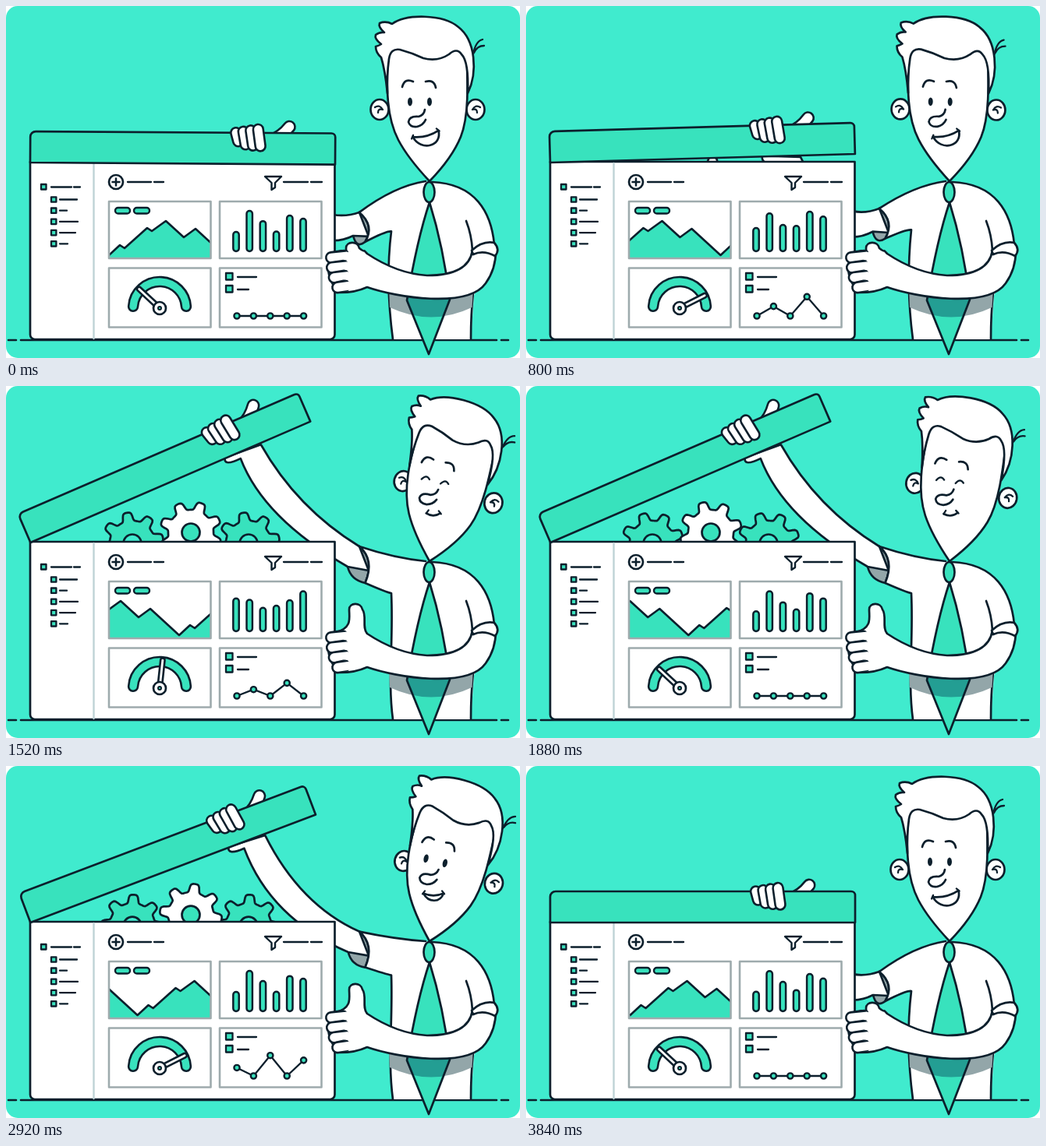
An HTML page with a canvas for the animation above (3.88 s loop, 659x452 px).

```html
<!DOCTYPE html>
<html lang="en">
<head>
<meta charset="utf-8">
<title>Open the dashboard</title>
<style>
html, body { margin: 0; width: 100%; height: 100%; overflow: hidden; background: #fff; }
canvas { display: block; width: 659px; height: 452px; }
</style>
</head>
<body>
<canvas id="stage" width="659" height="452"></canvas>
<script>
const c = document.getElementById('stage').getContext('2d');
const LOOP = 3880, HALF = LOOP / 2, BEAT = LOOP / 4;
const INK = '#0c1f2c', BG = '#40ebce', TEAL = '#38e2bd', WHITE = '#fff', GREY = '#93a6a9', SHADE = '#239e93';
const { sin, cos, tanh, PI, min, max } = Math;
const RAD = PI / 180;

// Motion: every part is a sum of eased steps and humps between two times
const part = (t, a, b) => min(1, max(0, (t - a) / (b - a)));
const ease = (t, a, b) => { const u = part(t, a, b); return u * u * (3 - 2 * u); };
const hump = (t, a, b) => sin(PI * part(t, a, b)) ** 2;

const kick = t => hump(t, 900, 1400);
const lidOpen = t => ease(t, 740, 1120) - ease(t, 2810, 3340) + .2 * kick(t) - .025 * hump(t, -250, 600);
const headTurn = t => ease(t, 760, 1120) - ease(t, 2950, 3350) - .35 * hump(t, 1450, 2300);
const tieSwing = t => 10 * hump(t, 800, 1500) + 5 * hump(t, 2050, 2650) - 5 * hump(t, 3000, 3700);
const thumbUp = t => ease(t, 850, 1150) - ease(t, 2950, 3300);
const gearRise = t => ease(t, 850, 1300) - ease(t, 2850, 3300);
const grin = t => 1 - ease(t, 850, 1050) + .5 * ease(t, 2450, 2850) + .5 * ease(t, 3000, 3300);
const needle = t => 137 - 110 * (ease(t, 100, 750) - ease(t, 1250, 1780));
const dotRise = t => ease(t, 200, 1200) - ease(t, 1250, 1750);

// Drawing helpers
function paint(fill, stroke = INK, width = 2.7, path) {
  const p = path ? [path] : [];
  if (fill) { c.fillStyle = fill; c.fill(...p); }
  if (stroke) { c.strokeStyle = stroke; c.lineWidth = width; c.stroke(...p); }
}
const shape = (d, fill, stroke, width) => paint(fill, stroke, width, new Path2D(d));
function oval(x, y, rx, ry, fill, stroke, width) {
  c.beginPath(); c.ellipse(x, y, rx, ry, 0, 0, 2 * PI); paint(fill, stroke, width);
}
function box(x, y, w, h, r, fill, stroke, width) {
  c.beginPath(); c.roundRect(x, y, w, h, r); paint(fill, stroke, width);
}
function tube(d, width, fill) {
  shape(d, null, INK, width);
  shape(d, null, fill, width - 5.2);
}
const line = (d, width = 2.3) => shape(d, null, INK, width);
const tick = (x, y, size) => box(x, y, size, size, 0, TEAL, INK, 2.3);
function group(draw) { c.save(); draw(); c.restore(); }
function spin(x, y, deg) { c.translate(x, y); c.rotate(deg * RAD); c.translate(-x, -y); }

function gear(x, y, turn, fill) {
  c.beginPath();
  for (let a = 0; a < 360; a += 2) {
    const r = 34.5 + 5.5 * tanh(2.4 * cos(8 * a * RAD) - .3), q = (a + turn) * RAD;
    c.lineTo(x + r * sin(q), y - r * cos(q));
  }
  c.closePath(); paint(fill);
  oval(x, y, 11.5, 11.5, fill === WHITE ? TEAL : BG);
}

function gears(t) {
  const y = 46 * (1 - gearRise(t)), turn = t * 90 / LOOP;
  gear(162, 202 + y, 25 - turn, TEAL);
  gear(311, 202 + y, 25 - turn, TEAL);
  gear(237, 188 + y, turn - 15, WHITE);
}

function hills(t) {
  const period = 148, ridge = [[0, 276], [23, 297], [38, 286], [75, 320], [89, 307], [95, 311], [124, 285], [130, 289]];
  group(() => {
    c.beginPath(); c.rect(132, 251, 130, 73); c.clip();
    c.beginPath(); c.moveTo(-200, 340);
    for (let k = -1; k < 3; k++)
      for (const [x, y] of ridge) c.lineTo(205 + x + (k - t / LOOP) * period, y);
    c.lineTo(700, 340);
    paint(TEAL, INK, 2.6);
  });
  box(140, 259, 19, 7.5, 4, TEAL, INK, 2.4);
  box(164, 259, 20, 7.5, 4, TEAL, INK, 2.4);
}

// Each bar: mean top, swing, phase in degrees
const BARS = [[281, 9, 0], [269, -6, 0], [280, 5, 220], [287, 7, 70], [274, 10, 120], [268, 5, 0]];
function bars(t) {
  BARS.forEach(([mean, swing, phase], i) => {
    const y = mean + swing * cos(2 * PI * t / BEAT - phase * RAD);
    box(291.3 + 17.2 * i, y, 7.4, 315 - y, 3.7, TEAL, INK, 2.5);
  });
}

function gauge(t) {
  c.beginPath(); c.arc(197, 388, 34, PI * 1.02, PI * 1.98);
  paint(null, INK, 14.5); paint(null, TEAL, 9.3);
  const a = needle(t % HALF) * RAD;
  tube(`M197 388L${197 + 36 * cos(a)} ${388 - 36 * sin(a)}`, 8, WHITE);
  oval(197, 388, 8, 8, WHITE);
  oval(197, 388, 2, 2, TEAL, INK, 2);
}

function lineChart(t) {
  tick(282, 343, 8.5); tick(282, 359, 8.5);
  line('M297 348H321M297 364H311');
  const peaks = t < HALF ? [0, 19, 0, 38, 0] : [12, 0, 30, 0, 23];
  const dots = peaks.map((v, i) => [296 + 21.4 * i, 398 - v * dotRise(t % HALF)]);
  line('M' + dots.join('L'));
  for (const [x, y] of dots) oval(x, y, 3.6, 3.6, TEAL, INK, 2.4);
}

function panel(t) {
  box(31, 200, 390.5, 228, [0, 0, 6, 6], WHITE);
  shape('M112.5 202V427', null, '#bfd3d6', 2.4);
  tick(45, 229, 6.5);
  line('M58 232.5H84M87 232.5H95');
  [22, 9, 23, 20, 10].forEach((w, i) => {
    const y = 248.5 + 14.2 * i;
    tick(58, y - 3.2, 6.4);
    line(`M69 ${y}h${w}`);
  });
  oval(141, 226, 9, 9, WHITE);
  line('M136.5 226h9M141 221.5v9', 2.5);
  shape('M332 219H353L345 227V233L340.5 236V227Z', WHITE, INK, 2.4);
  line('M156 226H186M190 226H202M356 226H387M391 226H405');
  hills(t);
  for (const x of [132, 274])
    for (const y of [251, 336.5]) box(x, y, 130.5, y > 300 ? 76 : 73, 0, null, '#9eabad', 2.6);
  bars(t); gauge(t); lineChart(t);
}

function lid(angle) {
  group(() => {
    spin(31, 200, -angle);
    tube('M338 171Q353 166 363 153', 17, WHITE);
    box(31, 161, 391, 40, [7, 5, 0, 0], TEAL);
    for (let i = 0; i < 4; i++) {
      const x = 294.5 + 9.5 * i;
      tube(`M${x} ${161 - 1.5 * i}L${x + 3} ${180 - 8 / (i + 1)}`, 15.5, WHITE);
    }
  });
}

// Left sleeve opening for a given lift: top, outer control, bottom, inner edge, armpit
function sleeve(k) {
  const y = 264 - 58 * k;
  return { top: [453, y], out: [473, y + 17], low: [460.5, y + 38 + 9 * k], inner: [445 - 7 * k, y + 30 - 4 * k], pit: 289 - 23 * k };
}

function arm(angle, k) {
  const s = sin(angle * RAD), q = cos(angle * RAD);
  const onLid = (x, y) => [31 + x * q + y * s, 200 - x * s + y * q];
  const wrist = onLid(321, 3), heel = onLid(290, 9), palm = onLid(272, 0);
  const { top, out, low, inner } = sleeve(k), m = max(0, k) ** 1.5;
  shape(`M${top}Q${out} ${low}Q${inner[0] + 4} ${inner[1] + 17} ${inner}Z`, GREY);
  shape(`M${wrist}Q${395 - 22 * m} ${285 - 128 * m} ${top}L${out[0] - 8} ${out[1] + 14}L${inner}`
    + `Q${385 - 55 * m} ${325 - 155 * m} ${heel}Q${palm[0] - 2} ${palm[1] + 12} ${palm}Z`, WHITE);
}

function body(k) {
  const { top, out, low, pit } = sleeve(k);
  const left = `M538 225Q498 ${231 - 10 * k} ${top}Q${out} ${low}Q488 ${pit - 1} ${494} ${pit}C${489 + 8 * k} 330 489 375 496 428`;
  shape(left + 'H596L600 372L627 306C622 265 602 228 546 226Z', WHITE, null);
  line(left, 2.7);
  line('M596 428Q596 395 599 368M546 226C602 228 622 265 626 306M590 276Q597 294 598 314', 2.7);
}

const SHADOW = 'M490.5 347L599 362L597.5 387Q545 412 492 387Z';
function tie(swing) {
  const blade = 'M543 252Q527 300 514 378L542 447L569 377Q561 310 543 252Z';
  const hang = (fill, stroke) => group(() => { spin(543, 243, swing); shape(blade, fill, stroke); });
  shape(SHADOW, GREY, null);
  hang(TEAL, null);
  group(() => { c.clip(new Path2D(SHADOW)); hang(SHADE, null); });
  hang(null);
  oval(542.5, 239, 7, 13, TEAL);
}

function thumbArm(t) {
  spin(620, 325, 8.3 * kick(t));
  const x = 444 + 4 * thumbUp(t), y = 304 - 24 * thumbUp(t);
  shape(`M598 314C594 340 567 346 540 346C507 344 481 330 463 318C456 310 463 ${y + 15} ${x + 9} ${y + 7}`
    + `C${x + 7} ${y - 3} ${x - 8} ${y - 2} ${x - 8} ${y + 7}C${x - 8} ${y + 18} 444 310 424 316`
    + 'C410 322 408 350 428 368Q448 368 463 361C500 374 592 389 615 356Q628 338 628 314Z', WHITE);
  for (let i = 0; i < 4; i++) {
    const a = 417 + .9 * i * i, b = 323 + 12.8 * i;
    line(`M${a} ${b}L${431 + i} ${b - 2}`, 16);
    shape(`M${a} ${b}L${436 + i} ${b - 2}`, null, WHITE, 10.8);
  }
  shape('M597 314Q611 301 626 304Q634 313 627 321Q612 313 599 319Z', WHITE);
}

function face(t) {
  line('M508 104Q511 92 522 97M538 97Q549 94 551 105', 2.7);
  const shut = t > 1000 && t < 2130;
  for (const x of [518, 543]) {
    if (shut) line(`M${x - 5} 125Q${x} 117 ${x + 5} 123`);
    else oval(x, 123, 3, 5.4, INK, null);
  }
  line('M537 133Q536 140 529 142Q517 141 516 149Q518 156 527 155Q535 153 538 146', 2.7);
  c.translate(538, 164); c.rotate(-14 * RAD);
  const g = grin(t), w = 9 + 8 * g, dip = 6, drop = dip / 1.5 + 17 * g;
  shape(`M${-w} 0Q0 ${dip} ${w} 0C${w * (1 + 2 * g) / 3} ${drop} ${-w * (1 + g) / 3} ${drop} ${-w} 0Z`, WHITE);
  line(`M${-w - 2 * g} ${2 * g}l3 -4M${w - 2} -3l3 4`);
}

function ear(x, y, side) {
  oval(x, y, 11.5, 13, WHITE);
  c.save(); c.translate(x, y); c.scale(side, 1);
  line('M-4 0Q0 -7 6 -3M-4 0Q2 -2 2 4');
  c.restore();
}

function head(t) {
  const h = headTurn(t);
  c.translate(543, 225); c.scale(1, 1 + .037 * kick(t)); c.rotate(14 * h * RAD); c.translate(-543, -225);
  line('M599 62Q602 45 611 43M600 60Q604 51 613 51');
  ear(479 + 7 * h, 133, -1);
  ear(602 + 3 * h, 133, 1);
  shape('M491 45C486 110 489 145 503 172Q515 195 543 225Q572 195 583 168C594 140 592 100 590 45Z', WHITE);
  shape('M489 112Q486 82 481 66Q474 60 474 52Q478 51 481 49Q472 42 474 37Q479 33 485 34Q477 27 479 22Q487 19 495 23'
    + 'C513 10 560 10 580 27C602 44 605 85 592 112C593 85 590 68 584 62Q578 53 568 62Q553 72 535 67'
    + 'Q520 60 505 56Q493 54 491 68Q488 90 489 112Z', WHITE);
  c.translate(-5 * h, 0);
  face(t);
}

function draw(t) {
  const k = lidOpen(t), angle = 23.4 * k;
  c.clearRect(0, 0, 659, 452);
  c.lineCap = c.lineJoin = 'round';
  group(() => {
    c.beginPath(); c.roundRect(0, 0, 659, 452, 15); c.clip();
    c.fillStyle = BG; c.fillRect(0, 0, 659, 452);
    line('M3 429H13M19 429H629M635 429H644', 2.6);
    gears(t);
    arm(angle, k);
    panel(t);
    lid(angle);
    body(k);
    tie(tieSwing(t));
    group(() => thumbArm(t));
    group(() => head(t));
  });
}

const start = performance.now();
function play(now) {
  draw(max(0, now - start) % LOOP);
  requestAnimationFrame(play);
}
draw(0);
requestAnimationFrame(play);
</script>
</body>
</html>
```
